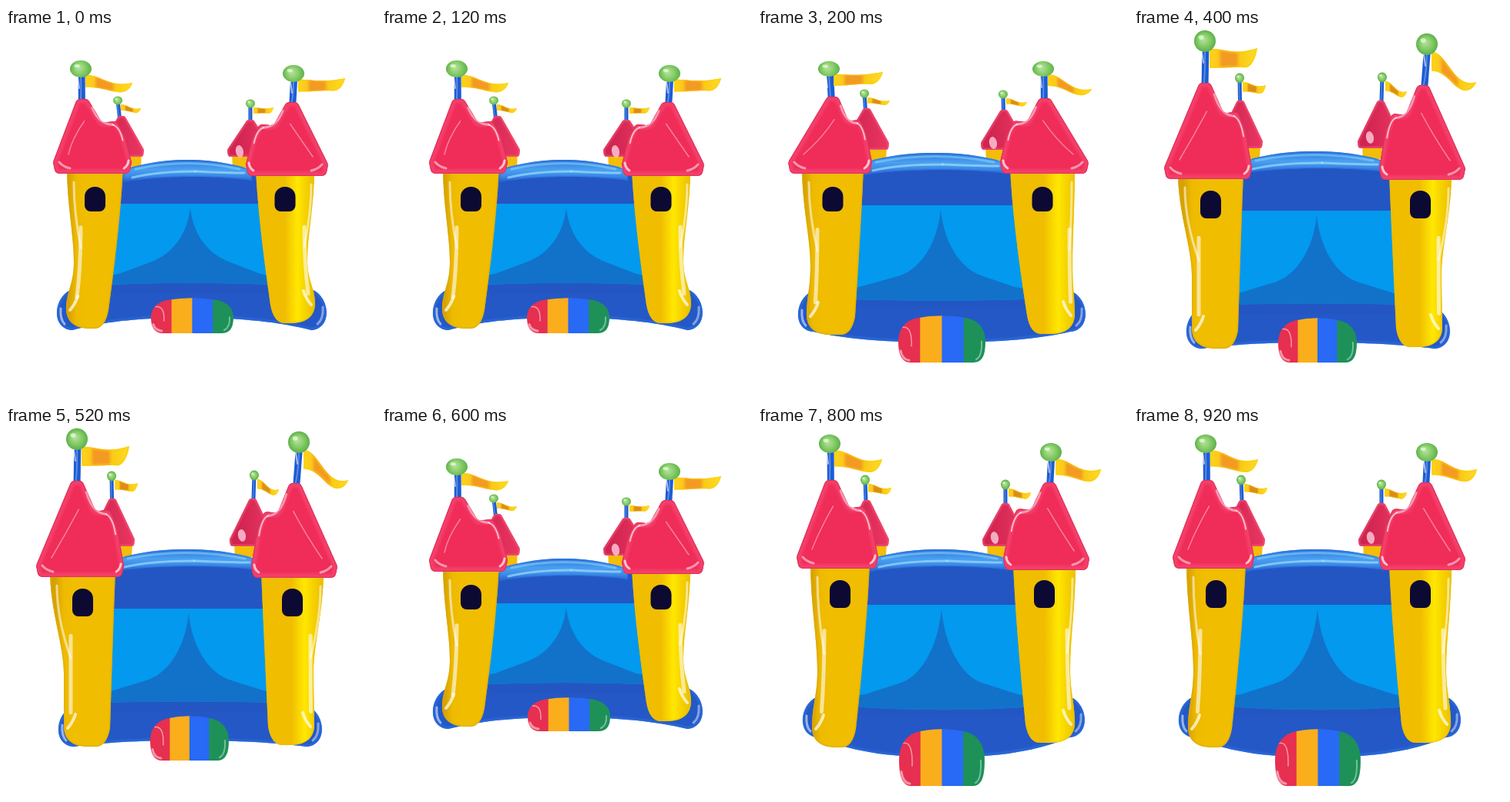
Write an HTML page with a canvas that moves like this. It is 480 px wide and 480 px high and loops after 1000 ms.

```html
<!DOCTYPE html>
<html lang="en">
<head>
<meta charset="utf-8">
<title>Bouncy castle</title>
<style>
  html, body { margin: 0; width: 100%; height: 100%; overflow: hidden; background: #fff; }
  canvas { display: block; width: 480px; height: 480px; }
</style>
</head>
<body>
<canvas id="stage" width="480" height="480"></canvas>
<script>
const ctx = document.getElementById('stage').getContext('2d');
const STEP = 200;

// ball: x, y, ry; roof: apex x, y, eave left, right, bottom
// column: outer waist, outer foot, inner foot, bottom; tip: flag end
// base: left, right, corner bottom, middle bottom
const squat = {
  flagH: 16, top: 171, wall: 228, floor: 334, peak: 239,
  base: [66, 416, 392, 376], step: [188, 295, 350, 396],
  left: { ball: [97, 53, 11], roof: [99, 92, 61, 163, 188], column: [88, 78, 133, 390], tip: [164, 71] },
  right: { ball: [373, 59, 11], roof: [371, 96, 311, 418, 191], column: [391, 401, 343, 383], tip: [440, 65] },
  back: [[145, 94, 150, 114, 175, 104], [317, 98, 317, 119, 347, 103]]
};
const sag = { ...squat, top: 172, wall: 230, floor: 336, base: [66, 416, 393, 378], step: [189, 296, 352, 396] };
const wide = {
  flagH: 15, top: 162, wall: 230, floor: 351, peak: 237,
  base: [52, 425, 394, 408], step: [182, 295, 373, 434],
  left: { ball: [92, 53, 10], roof: [97, 89, 39, 148, 188], column: [68, 63, 126, 398], tip: [162, 57] },
  right: { ball: [370, 53, 10], roof: [372, 91, 314, 429, 188], column: [408, 411, 349, 397], tip: [433, 79] },
  back: [[138, 85, 141, 104, 171, 94], [318, 86, 319, 106, 349, 96]]
};
const tall = {
  flagH: 25, top: 160, wall: 237, floor: 359, peak: 237,
  base: [68, 410, 416, 408], step: [187, 289, 376, 434],
  left: { ball: [92, 17, 14], roof: [92, 71, 39, 153, 195], column: [75, 75, 135, 416], tip: [160, 26] },
  right: { ball: [380, 21, 14], roof: [375, 74, 318, 430, 196], column: [399, 400, 340, 414], tip: [444, 70] },
  back: [[137, 65, 138, 94, 171, 74], [322, 64, 320, 94, 354, 82]]
};
const stretched = {
  flagH: 21, top: 160, wall: 232, floor: 363, peak: 238,
  base: [58, 424, 404, 430], step: [183, 294, 393, 467],
  left: { ball: [93, 23, 12], roof: [95, 70, 50, 156, 184], column: [77, 70, 127, 417], tip: [161, 43] },
  right: { ball: [380, 34, 12], roof: [378, 73, 318, 430, 186], column: [405, 411, 347, 411], tip: [445, 56] },
  back: [[139, 70, 141, 96, 173, 80], [321, 76, 321, 100, 354, 86]]
};
const poses = [squat, wide, tall, sag, stretched];

function rounded(points, r) {
  const p = new Path2D(), n = points.length, a = points[n - 1], b = points[0];
  p.moveTo((a[0] + b[0]) / 2, (a[1] + b[1]) / 2);
  points.forEach((q, i) => p.arcTo(...q, ...points[(i + 1) % n], r));
  p.closePath();
  return p;
}

function fill(path, color) {
  ctx.fillStyle = color;
  ctx.fill(path);
}

function poly(points, color) {
  const p = new Path2D();
  points.forEach(q => p.lineTo(...q));
  fill(p, color);
}

function blend(x0, y0, x1, y1, ...stops) {
  const g = ctx.createLinearGradient(x0, y0, x1, y1);
  stops.forEach(([at, color]) => g.addColorStop(at, color));
  return g;
}

// Soft inner edge, like inflated vinyl
function rim(path, color, size) {
  ctx.save();
  ctx.clip(path);
  ctx.strokeStyle = color;
  ctx.globalAlpha = 0.22;
  for (let w = 1; w <= 4; w++) {
    ctx.lineWidth = size * w / 2;
    ctx.stroke(path);
  }
  ctx.restore();
}

function puff(path, color, edge, size) {
  fill(path, color);
  rim(path, edge, size);
}

function shine(x0, y0, cx, cy, x1, y1, width, alpha, tint = '255,255,255') {
  ctx.strokeStyle = `rgba(${tint},${alpha})`;
  ctx.lineWidth = width;
  ctx.lineCap = 'round';
  ctx.beginPath();
  ctx.moveTo(x0, y0);
  ctx.quadraticCurveTo(cx, cy, x1, y1);
  ctx.stroke();
}

function blob(x, y, rx, ry, color, turn = 0) {
  ctx.fillStyle = color;
  ctx.beginPath();
  ctx.ellipse(x, y, rx, ry, turn, 0, 7);
  ctx.fill();
}

function ball(x, y, rx, ry) {
  const g = ctx.createRadialGradient(x - rx * 0.2, y - ry * 0.2, 1, x, y, rx);
  g.addColorStop(0, '#b4e29a');
  g.addColorStop(0.55, '#84cb66');
  g.addColorStop(1, '#5cb04c');
  blob(x, y, rx, ry, g);
  blob(x - rx * 0.35, y - ry * 0.35, rx * 0.25, ry * 0.2, 'rgba(235,255,225,.7)');
}

function pole(x0, y0, x1, y1, w) {
  poly([[x0 - w, y0], [x0 + w, y0], [x1 + w, y1], [x1 - w, y1]], '#1c5cd4');
  shine(x0 - w * 0.3, y0 + 2, x0, (y0 + y1) / 2, x1 - w * 0.3, y1 - 3, w * 0.4, 0.3);
}

function flag(x, y, tx, ty, h, mid) {
  const len = tx - x, low = ty + h - (ty - y) * 0.35;
  const p = new Path2D();
  p.moveTo(x, y);
  p.bezierCurveTo(x + len * 0.35, y, x + len * 0.5, ty + h * 0.4, tx, ty);
  p.bezierCurveTo(tx - len * 0.03, (ty + low) / 2, tx - len * 0.12, low, tx - len * 0.25, low);
  p.bezierCurveTo(x + len * 0.5, low - 1, x + len * 0.35, y + h, x, y + h);
  p.closePath();
  puff(p, blend(x, 0, tx, 0, [0, '#ffd41c'], [0.18, '#fcc81c'], [0.26, mid], [0.55, mid],
    [0.64, '#f9ca15'], [1, '#ffdc2a']), '#fbcc08', h * 0.12);
}

function backTower([bx, by, ax, ay, tx, ty], pose) {
  const eave = pose.top - 4;
  poly([[ax - 24, eave - 5], [ax + 26, eave - 5], [ax + 25, eave + 14], [ax - 23, eave + 14]], '#f3bd08');
  pole(bx, by, ax - (ax - bx) * 0.4, ay + 8, 2.5);
  flag(bx + 4, by + 5, tx, ty, pose.flagH * 0.5, '#dd8d15');
  ball(bx, by, 6, pose.flagH > 20 ? 6.5 : 5.5);
  const roof = rounded([[ax - 4, ay], [ax + 4, ay], [ax + 29, eave - 9], [ax + 28, eave],
    [ax - 29, eave], [ax - 30, eave - 9]], 4);
  puff(roof, blend(ax - 20, 0, ax + 25, 0, [0, '#d02450'], [1, '#e83560']), '#f3587c', 3);
}

function shaft(t, side) {
  const [, , el, er] = t.roof;
  return side > 0 ? { outer: el + 18, inner: er - 11 } : { outer: er - 18, inner: el + 13 };
}

function column(t, side) {
  const eave = t.roof[4], k = side;
  const [waist, foot, inFoot, bottom] = t.column;
  const { outer, inner } = shaft(t, side);
  const h = bottom - eave;

  const p = new Path2D();
  p.moveTo(outer, eave - 8);
  p.bezierCurveTo(outer, eave + h * 0.2, waist, eave + h * 0.4, waist, eave + h * 0.57);
  p.bezierCurveTo(waist, eave + h * 0.72, foot, eave + h * 0.76, foot, bottom - 26);
  p.bezierCurveTo(foot, bottom - 10, foot + k * 10, bottom, foot + k * 32, bottom);
  p.lineTo(inFoot - k * 18, bottom);
  p.quadraticCurveTo(inFoot - k * 4, bottom - 1, inFoot, bottom - 24);
  p.quadraticCurveTo(inner - k * 3, eave + h * 0.3, inner, eave - 8);
  p.closePath();

  const edge = (outer + waist) / 2;
  const skin = side > 0
    ? blend(edge - 3, 0, inner, 0, [0, '#d6a000'], [0.15, '#edba00'], [0.3, '#f0bd00'])
    : blend(inner, 0, edge + 4, 0, [0.5, '#f0bd00'], [0.72, '#ffe800'], [0.84, '#f7d400'], [1, '#ecc000']);
  puff(p, skin, side > 0 ? '#dca800' : '#e9bb00', 2);
  ctx.save();
  ctx.clip(p);
  const gap = side > 0 ? 9 : -4;
  shine(outer + gap, eave + 12, outer + gap, eave + h * 0.25, waist + gap, eave + h * 0.48, 3, 0.55);
  shine(waist + gap, eave + h * 0.35, waist + gap, eave + h * 0.6, (waist + foot) / 2 + gap, eave + h * 0.8, 5, 0.6);
  shine(foot + k * 5, bottom - 24, foot + k * 12, bottom - 32, foot + k * 15, bottom - 42, 4, 0.7);
  ctx.restore();
}

function roof(t, side) {
  const [ax, ay, el, er, eave] = t.roof, k = side;
  const inEave = k > 0 ? er : el, outEave = k > 0 ? el : er;
  const h = eave - ay, w = inEave - ax;
  const at = (u, v) => [ax + w * u, ay + h * v];

  const p = rounded([[ax + k * 7, ay], at(0.4, 0.32), at(0.7, 0.3), at(0.86, 0.5), [inEave, eave - 14],
    [inEave - k * 3, eave + 1], [outEave + k * 3, eave + 1], [outEave, eave - 14], [ax - k * 7, ay]], 7);
  puff(p, '#f02c58', '#f4547a', 7);
  rim(p, '#cc2450', 1.5);
  ctx.save();
  ctx.clip(p);
  shine(...at(0.2, 0.12), ...at(0.33, 0.34), ...at(0.62, 0.35), 3, 0.6, '255,215,228');
  shine(...at(0.62, 0.35), ...at(0.76, 0.38), ...at(0.82, 0.56), 2, 0.65);
  shine(...at(0.04, 0.3), ax - k * 14, ay + h * 0.55, outEave + k * 20, eave - 24, 1.5, 0.4);
  shine(outEave + k * 8, eave - 14, outEave + k * 13, eave - 8, outEave + k * 22, eave - 6, 3, 0.5);
  shine(inEave - k * 10, eave - 6, inEave - k * 5, eave - 9, inEave - k * 4, eave - 16, 3, 0.7);
  ctx.restore();
}

function frontTower(t, side, pose) {
  const [bx, by, ry] = t.ball, [ax, ay] = t.roof;
  const { outer, inner } = shaft(t, side);
  column(t, side);

  const wh = pose.flagH > 20 ? 18 : 16;
  const hole = new Path2D();
  hole.roundRect((outer + inner) / 2 - 13.5, pose.left.roof[4] + 34 - wh, 27, wh * 2, [13, 13, 8, 8]);
  fill(hole, '#0c0a32');

  pole(bx + 1, by, ax - (ax - bx) * 0.3, ay + 6, 4.5);
  flag(bx + 6, by + ry * 0.7, ...t.tip, pose.flagH, '#f39a22');
  ball(bx, by, 14, ry);
  shine(bx - 4, by + ry, bx - 3, by + ry + 6, bx - 2, by + ry + 14, 2, 0.6);
  roof(t, side);
}

function topBar(top, e0, e1) {
  const c = (e0 + e1) / 2, p = new Path2D();
  p.moveTo(e0, top + 29);
  p.lineTo(e0, top + 13);
  p.bezierCurveTo(e0 + 15, top + 8, e0 + 45, top, c, top);
  p.bezierCurveTo(e1 - 45, top, e1 - 15, top + 8, e1, top + 13);
  p.lineTo(e1, top + 27);
  p.bezierCurveTo(e1 - 45, top + 20, e0 + 45, top + 20, e0, top + 29);
  puff(p, blend(0, top, 0, top + 28, [0, '#2c78da'], [0.45, '#4aa0f0'], [0.75, '#3a8ae6'], [1, '#2a64d0']), '#2a70d8', 2);
  shine(e0 + 16, top + 12, c, top - 3, e1 - 16, top + 12, 3, 0.45, '160,225,255');
  shine(e0 + 12, top + 23, e0 + 45, top + 15, c + 10, top + 15, 3, 0.6, '175,232,255');
  shine(c + 10, top + 15, e1 - 30, top + 17, e1 - 10, top + 17, 3, 0.6, '175,232,255');
}

function body(pose) {
  const { top, wall, floor, peak, left, right } = pose;
  const [b0, b1, corner, mid] = pose.base;
  const l = shaft(left, 1), r = shaft(right, -1);
  const x0 = (l.outer + l.inner) / 2, x1 = (r.outer + r.inner) / 2;
  const c = (b0 + b1) / 2, dip = mid - corner;

  const base = new Path2D();
  base.moveTo(b0 + 20, corner - 53);
  base.bezierCurveTo(b0 - 4, corner - 45, b0 - 9, corner - 2, b0 + 20, corner);
  base.bezierCurveTo(b0 + 60, corner + dip * 0.65, 165, mid, c, mid);
  base.bezierCurveTo(b1 - 110, mid, b1 - 60, corner + dip * 0.65, b1 - 20, corner);
  base.bezierCurveTo(b1 + 9, corner - 2, b1 + 4, corner - 45, b1 - 20, corner - 53);
  base.closePath();
  puff(base, '#2458c6', '#2f74e4', 4);
  shine(b0 + 5, corner - 28, b0 + 4, corner - 14, b0 + 10, corner - 8, 3, 0.55);
  shine(b1 - 5, corner - 30, b1 - 4, corner - 14, b1 - 12, corner - 8, 3, 0.45);

  poly([[x0, top + 18], [x1, top + 18], [x1, floor + 12], [x0, floor + 12]], '#2456c3');

  const room = new Path2D();
  room.moveTo(x0, wall);
  room.lineTo(x1, wall);
  room.lineTo(x1, floor);
  room.quadraticCurveTo(c, floor + dip * 0.4, x0, floor);
  fill(room, '#0299ee');

  const drape = new Path2D(), arm = wall + (floor - wall) * 0.4;
  drape.moveTo(x0, floor - 9);
  drape.lineTo(l.inner - 6, floor - 15);
  drape.lineTo(peak - 52, floor - 30);
  drape.bezierCurveTo(peak - 25, floor - 40, peak - 4, arm, peak, wall + 5);
  drape.bezierCurveTo(peak + 4, arm, peak + 25, floor - 40, peak + 52, floor - 30);
  drape.lineTo(r.inner + 6, floor - 15);
  drape.lineTo(x1, floor - 9);
  drape.lineTo(x1, floor);
  drape.quadraticCurveTo(c, floor + dip * 0.4, x0, floor);
  fill(drape, '#1272c9');

  topBar(top, l.inner, r.inner - 5);
}

function doorstep([x0, x1, y0, y1]) {
  const w = x1 - x0, h = y1 - y0, p = new Path2D();
  p.moveTo(x0, y0 + h * 0.55);
  p.bezierCurveTo(x0, y0 + h * 0.3, x0 + 8, y0 + h * 0.12, x0 + 22, y0 + h * 0.06);
  p.quadraticCurveTo(x0 + w / 2, y0 - h * 0.05, x1 - 22, y0 + h * 0.06);
  p.bezierCurveTo(x1 - 8, y0 + h * 0.12, x1, y0 + h * 0.3, x1, y0 + h * 0.55);
  p.bezierCurveTo(x1, y1 - h * 0.15, x1 - 4, y1, x1 - 16, y1);
  p.lineTo(x0 + 16, y1);
  p.bezierCurveTo(x0 + 5, y1, x0, y1 - h * 0.15, x0, y0 + h * 0.55);
  ctx.save();
  ctx.clip(p);
  ['#e72f50', '#fbae1c', '#2869f5', '#1e9158'].forEach((color, i) => {
    ctx.fillStyle = color;
    ctx.fillRect(x0 + w * i / 4, y0 - 2, w / 4 + 1, h + 4);
  });
  shine(x0 + 6, y0 + h * 0.25, x0 + 18, y0 + h * 0.22, x0 + 17, y0 + h * 0.65, 1.5, 0.5);
  shine(x0 + 3, y1 - h * 0.25, x0 + 5, y1 - 4, x0 + 14, y1 - 3, 3, 0.5);
  shine(x1 - 5, y0 + h * 0.55, x1 - 4, y1 - 8, x1 - 12, y1 - 4, 2, 0.4);
  ctx.restore();
}

function draw(pose) {
  ctx.fillStyle = '#fff';
  ctx.fillRect(0, 0, 480, 480);
  pose.back.forEach(t => backTower(t, pose));
  const [, , ax, ay] = pose.back[1];
  blob(ax - 14, (ay + pose.top) / 2 + 15, 5, 8, 'rgba(255,205,222,.8)', -0.2);
  body(pose);
  frontTower(pose.left, 1, pose);
  frontTower(pose.right, -1, pose);
  doorstep(pose.step);
}

let start;
function tick(now) {
  start ??= now;
  draw(poses[Math.floor((now - start) / STEP) % poses.length]);
  requestAnimationFrame(tick);
}
draw(poses[0]);
requestAnimationFrame(tick);
</script>
</body>
</html>
```
